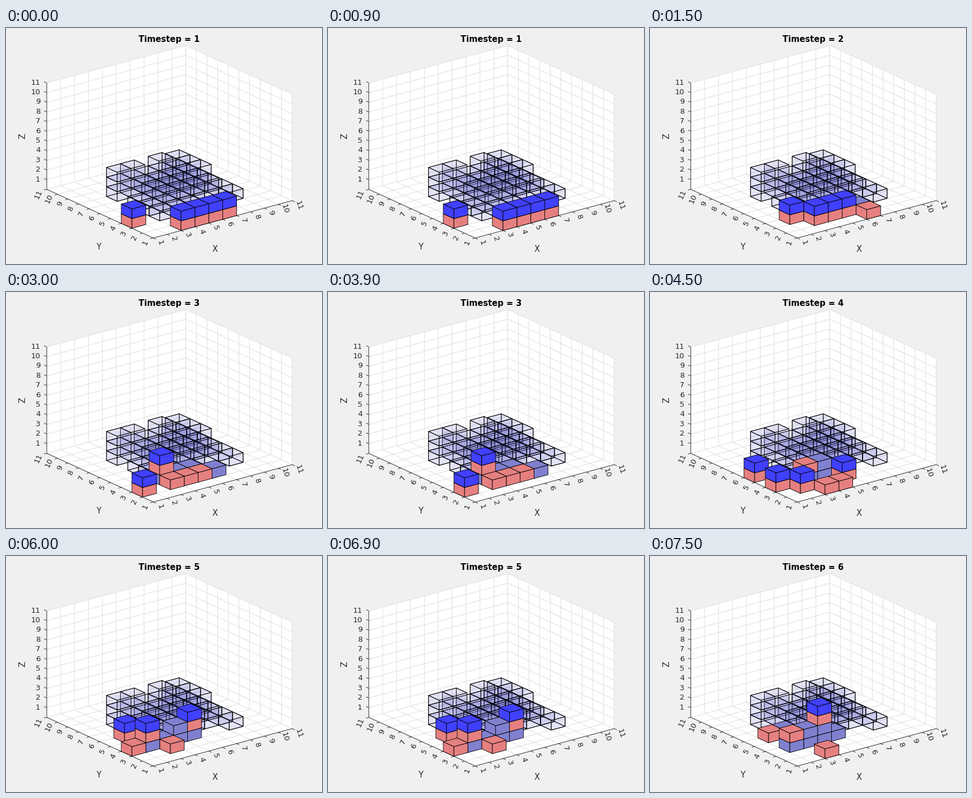
Animation, 565 px wide and 424 px high, one loop 8 s. Source, as a matplotlib script:

```python
import matplotlib.pyplot as plt
from matplotlib.animation import FuncAnimation
from matplotlib.collections import LineCollection, PolyCollection

W, H, DPI = 565, 424, 100
PX = 72 / DPI
INK = "#262626"
RED = (0.902, 0.502, 0.502, 1)
BLUE = (0.25, 0.25, 1, 1)
PLACED = (0.502, 0.502, 0.816, 1)
PLAN = (0.46, 0.46, 0.816, 0.1)

# Planned column heights: y -> {x: height}
HEIGHTS = {
    3: {3: 1, 4: 1, 5: 1, 8: 1},
    4: {3: 1, 4: 2, 5: 2, 6: 2, 7: 2, 8: 1},
    5: {3: 1, 4: 2, 5: 2, 6: 2, 7: 2, 8: 1},
    6: {4: 2, 5: 2, 6: 2, 7: 2, 8: 2},
    7: {3: 3, 4: 3, 5: 2, 6: 3, 7: 2, 8: 2},
    8: {8: 2},
}
PLAN_CELLS = [(x, y, z) for y, row in HEIGHTS.items()
              for x, h in row.items() for z in range(h)]

# Each step: loaded robots, empty robots, placed blocks
ROW = [(3, 3, 0), (4, 3, 0), (5, 3, 0)]
STEPS = [
    ([(1, 3, 0), (3, 1, 0), (4, 1, 0), (5, 1, 0), (6, 1, 0)], [], []),
    ([(2, 3, 0), (3, 2, 0), (4, 2, 0), (5, 2, 0)], [(6, 1, 0)], [(6, 2, 0)]),
    ([(1, 2, 0), (3, 3, 1)], [(3, 2, 0), (4, 2, 0), (5, 2, 0)],
     ROW + [(6, 2, 0)]),
    ([(1, 5, 0), (1, 3, 0), (2, 2, 0), (5, 2, 0)],
     [(3, 1, 0), (4, 1, 0), (3, 3, 1)], ROW + [(4, 3, 1)]),
    ([(2, 5, 0), (2, 3, 1), (5, 3, 1)], [(1, 3, 0), (3, 2, 0)],
     ROW + [(4, 3, 1), (2, 3, 0)]),
    ([(4, 3, 2)], [(2, 5, 0), (2, 3, 1), (3, 1, 0)],
     ROW + [(4, 3, 1), (2, 3, 0), (3, 3, 1), (3, 5, 0)]),
]


def project(x, y, z):
    """Orthographic view of a grid point in stage pixels."""
    return (263.2 + 24.85 * (x - 1) - 19.03 * (y - 1),
            377.3 - 6.72 * (x - 1) - 8.74 * (y - 1) - 17.38 * z)


def path(*points):
    return [project(*p) for p in points]


def cube_faces(x, y, z, hidden):
    X, Y, Z = x + 1, y + 1, z + 1
    back = [
        path((X, y, z), (X, Y, z), (X, Y, Z), (X, y, Z)),
        path((x, Y, z), (X, Y, z), (X, Y, Z), (x, Y, Z)),
        path((x, y, z), (X, y, z), (X, Y, z), (x, Y, z)),
    ]
    front = [
        path((x, y, z), (x, Y, z), (x, Y, Z), (x, y, Z)),
        path((x, y, z), (X, y, z), (X, y, Z), (x, y, Z)),
        path((x, y, Z), (X, y, Z), (X, Y, Z), (x, Y, Z)),
    ]
    return back + front if hidden else front


def build(step):
    """Faces and colours of one step, far cubes first."""
    loaded, empty, placed = step
    cells = {c: PLAN for c in PLAN_CELLS}
    cells.update({c: PLACED for c in placed})
    cells.update({c: RED for c in loaded + empty})
    cells.update({(x, y, z + 1): BLUE for x, y, z in loaded})
    polys, colors = [], []
    for cell in sorted(cells, key=lambda c: (-c[0], -c[1], c[2])):
        color = cells[cell]
        faces = cube_faces(*cell, hidden=color is PLAN)
        polys += faces
        colors += [color] * len(faces)
    return polys, colors


fig = plt.figure(figsize=(W / DPI, H / DPI), dpi=DPI, facecolor="#f0f0f0")
ax = fig.add_axes([0, 0, 1, 1])
ax.set_xlim(0, W)
ax.set_ylim(H, 0)
ax.axis("off")
plt.rcParams["font.family"] = "DejaVu Sans"


def label(x, y, s, size=13.33, **kw):
    opts = dict(ha="center", va="center", color=INK, fontsize=size * PX)
    opts.update(kw)
    return ax.text(x, y, s, **opts)


def draw_axes():
    walls = [
        path((1, 1, 0), (11, 1, 0), (11, 11, 0), (1, 11, 0)),
        path((11, 1, 0), (11, 11, 0), (11, 11, 11), (11, 1, 11)),
        path((1, 11, 0), (11, 11, 0), (11, 11, 11), (1, 11, 11)),
    ]
    ax.add_collection(PolyCollection(walls, facecolors="w", edgecolors="w",
                                     linewidths=0.3))
    grid, ticks = [], []
    for k in range(1, 12):
        grid += [path((k, 1, 0), (k, 11, 0), (k, 11, 11)),
                 path((1, k, 0), (11, k, 0), (11, k, 11)),
                 path((1, 11, k), (11, 11, k), (11, 1, k))]
        ticks += [path((k, 1, 0), (k, 0.75, 0)),
                  path((1, k, 0), (0.8, k, 0)),
                  path((1, 11, k), (1, 11.25, k))]
        x, y = project(k, 1, 0)
        label(x + 12, y + 8.5, k, rotation=-72)
        x, y = project(1, k, 0)
        label(x - 14.5, y + 8.5, k, rotation=65)
        x, y = project(1, 11, k)
        label(61.5, y - 2, k, ha="right", va="center_baseline")
    ax.add_collection(LineCollection(grid, colors="#dfdfdf", linewidths=PX))
    edges = [path((11, 1, 0), (1, 1, 0), (1, 11, 0), (1, 11, 11))]
    ax.add_collection(LineCollection(edges + ticks, colors=INK,
                                     linewidths=0.9 * PX))
    label(374, 397, "X", 14.67)
    label(165, 394, "Y", 14.67)
    label(30, 194, "Z", 14.67, rotation=90)


draw_axes()
title = label(291.5, 20, "", 14.67, weight="bold", color="k")
cubes = PolyCollection([], edgecolors="k", linewidths=0.9 * PX, zorder=2)
ax.add_collection(cubes, autolim=False)
scenes = [build(s) for s in STEPS]


def update(i):
    n = i // 3
    polys, colors = scenes[n]
    cubes.set_verts(polys)
    cubes.set_facecolor(colors)
    title.set_text(f"Timestep = {n + 1}")
    return cubes, title


anim = FuncAnimation(fig, update, frames=16, interval=500, repeat=True,
                     repeat_delay=0, blit=False)
plt.show()
```
